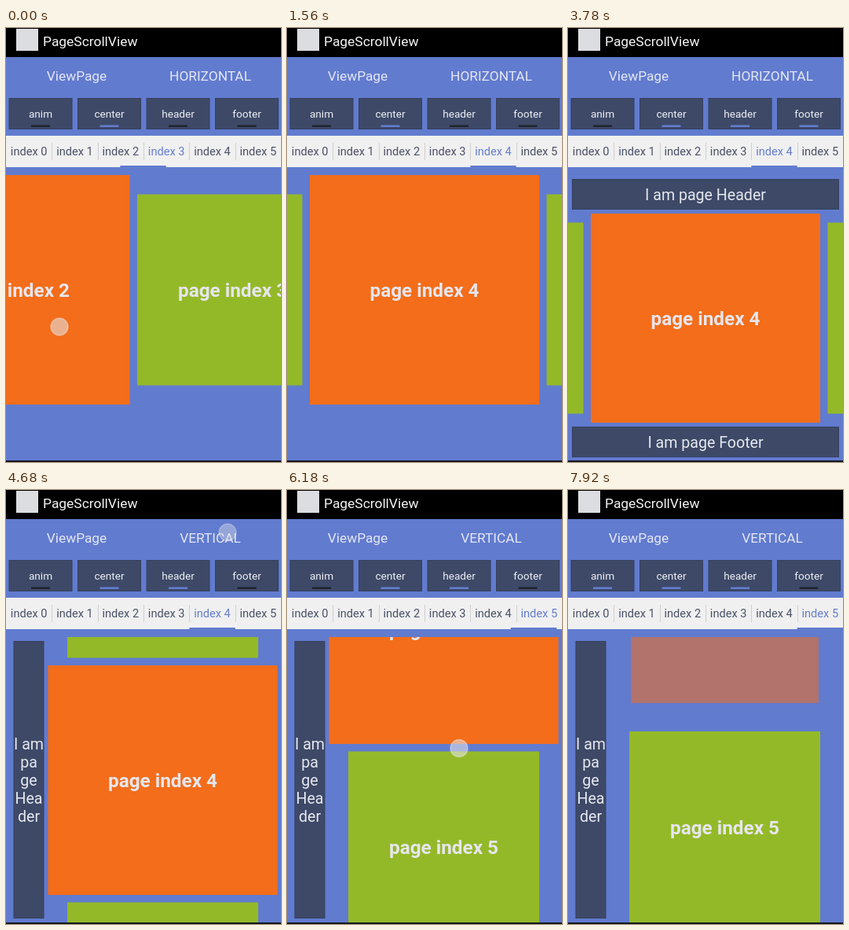
These frames come from a looping animation (350x552 px, 8000 ms). An HTML page with a canvas:

```html
<!DOCTYPE html>
<html lang="en">
<head>
<meta charset="utf-8">
<title>PageScrollView</title>
<style>
  html, body { margin: 0; width: 100%; height: 100%; overflow: hidden; background: #000; }
  canvas { display: block; width: 350px; height: 552px; }
</style>
</head>
<body>
<canvas id="stage"></canvas>
<script>
const LOOP = 8000, STEP = 60;
const BLUE = '#617bcf', NAVY = '#3d4967', ORANGE = '#f36d1a', GREEN = '#94b928';
const GAP = 277; // distance between the centres of neighbouring pages

const canvas = document.getElementById('stage');
const ctx = canvas.getContext('2d');
const dpr = window.devicePixelRatio || 1;
canvas.width = 350 * dpr;
canvas.height = 552 * dpr;
ctx.scale(dpr, dpr);

// Scroll relative to page 3 (horizontal) and page 4 (vertical), as [time, value]
const SCROLL_X = [[0, -113.5], [60, -70], [120, -34], [180, -10], [240, 0], [1140, 0],
  [1200, 14], [1260, 62], [1320, 128], [1380, 190], [1440, 240], [1500, 268], [1560, 277]];
const SCROLL_Y = [[5160, 0], [5220, 12], [5340, 62], [5460, 110], [5520, 122],
  [5700, 126], [5760, 132.5], [6000, 168], [6240, 200], [6420, 215], [6480, 217.5]];

// Taps as [start, x, y]
const TAPS = [[2580, 226, 112], [3540, 306, 112], [4140, 306, 112], [4620, 282, 54], [7020, 44, 112]];

function track(keys, t) {
  if (t <= keys[0][0]) return keys[0][1];
  for (let i = 1; i < keys.length; i++) {
    const [t0, a] = keys[i - 1], [t1, b] = keys[i];
    if (t < t1) return a + (b - a) * (t - t0) / (t1 - t0);
  }
  return keys[keys.length - 1][1];
}

function rect(x, y, w, h, color) {
  ctx.fillStyle = color;
  ctx.fillRect(x, y, w, h);
}

function text(str, x, y, size, color, align = 'center', weight = 400) {
  ctx.font = `${weight} ${size}px Roboto, sans-serif`;
  ctx.textAlign = align;
  ctx.fillStyle = color;
  ctx.fillText(str, x, y);
}

function panel(x, y, w, h) {
  rect(x, y, w, h, '#364160');
  rect(x + 1, y + 1, w - 2, h - 2, NAVY);
}

function drawTop(s) {
  rect(0, 0, 350, 37, '#000');
  ctx.fillStyle = '#dcdde0';
  ctx.fillRect(13, 1, 28, 28);
  text('PageScrollView', 47, 22.5, 17.4, '#f4f4f4', 'left');
  text('ViewPage', 90, 67, 17.3, '#e4e7f3');
  text(s.vertical ? 'VERTICAL' : 'HORIZONTAL', 260, 67, 17.3, '#e4e7f3');

  ['anim', 'center', 'header', 'footer'].forEach((name, i) => {
    const x = 3.5 + i * 87.5;
    panel(x, 89, 81, 40);
    text(name, x + 40.5, 113.5, 13.6, '#eef0f5');
    rect(x + 28.5, 123.5, 24, 2.5, s[name] ? '#647ed2' : '#20242e');
  });
}

function drawTabs(s) {
  const w = 350 / 6;
  rect(0, 137, 350, 40, '#f0f0f0');
  for (let i = 0; i < 6; i++) {
    text('index ' + i, (i + 0.5) * w, 162, 14.6, i === s.tab ? '#647dcd' : '#4a5166');
    if (i) rect(Math.round(i * w), 146, 1, 22, '#cfcfcf');
  }
  rect(s.pos * w, 175, w, 2, BLUE);
}

function drawPage(i, cx, cy, maxH, faded) {
  const even = i % 2 === 0, w = even ? 292 : 243, h = Math.min(w, maxH);
  ctx.save();
  ctx.translate(cx, cy);
  if (faded) {
    ctx.globalAlpha = 0.55;
    ctx.scale(0.818, 0.818);
  }
  rect(-w / 2, -h / 2, w, h, even ? ORANGE : GREEN);
  text('page index ' + i, 0, 9, 24.3, '#e6e6ee', 'center', 700);
  ctx.restore();
}

function drawHorizontal(s) {
  const top = s.header ? 236 : 187, h = s.footer ? 266 : 292;
  for (let i = 2; i < 6; i++) drawPage(i, 175 + (i - 3) * GAP - s.sx, top + h / 2, h);
  if (s.header) bar('Header', 192);
  if (s.footer) bar('Footer', 507);
}

function bar(name, y) {
  panel(5, y, 340, 39);
  text('I am page ' + name, 175, y + 27, 19.6, '#e6e8ef');
}

function drawVertical(s) {
  ctx.save();
  ctx.beginPath();
  ctx.rect(53, 187, 294, 363);
  ctx.clip();
  for (let i = 3; i < 6; i++) drawPage(i, 199.5, 369 + (i - 4) * GAP - s.sy, 292, s.anim && i === 4);
  ctx.restore();
  panel(9.5, 192, 39, 353);
  ['I am', 'pa', 'ge', 'Hea', 'der'].forEach((line, i) =>
    text(line, 29, 330 + i * 23, 19.6, '#e6e8ef'));
}

function dot(x, y, alpha = 1) {
  ctx.save();
  ctx.globalAlpha = alpha;
  ctx.beginPath();
  ctx.arc(x, y, 11, 0, 7);
  ctx.fillStyle = 'rgba(228,228,232,.58)';
  ctx.fill();
  ctx.lineWidth = 1.5;
  ctx.strokeStyle = 'rgba(240,240,240,.4)';
  ctx.stroke();
  ctx.restore();
}

function drawTouch(t, s) {
  if (t < 60) dot(68, 380);
  if (t >= 1140 && t <= 1380) dot(333 - s.sx, 279);
  if (t >= 5160 && t <= 6540) dot(219, 520.5 - s.sy, t > 6480 ? 0.5 : 1);
  for (const [start, x, y] of TAPS) {
    const age = t - start;
    if (age >= 0 && age < 180) dot(x, y, age < 120 ? 0.7 : 0.35);
  }
}

function stateAt(t) {
  const sx = track(SCROLL_X, t), sy = track(SCROLL_Y, t);
  const vertical = t >= 4680;
  const pos = vertical ? 4 + sy / 217.5 : 3 + sx / (sx < 0 ? 223 : GAP);
  return {
    sx, sy, vertical, pos,
    tab: t < 240 ? 3 : Math.round(pos),
    anim: t >= 7140,
    center: true,
    header: t >= 2640,
    footer: t >= 3600 && t < 4200
  };
}

function frame(now) {
  const t = Math.floor((now % LOOP) / STEP) * STEP;
  const s = stateAt(t);
  rect(0, 0, 350, 552, BLUE);
  if (s.vertical) drawVertical(s); else drawHorizontal(s);
  drawTop(s);
  drawTabs(s);
  rect(0, 550, 350, 2, '#15181f');
  drawTouch(t, s);
}

const begin = performance.now();
function tick() {
  frame(performance.now() - begin);
  requestAnimationFrame(tick);
}
tick();
</script>
</body>
</html>
```
